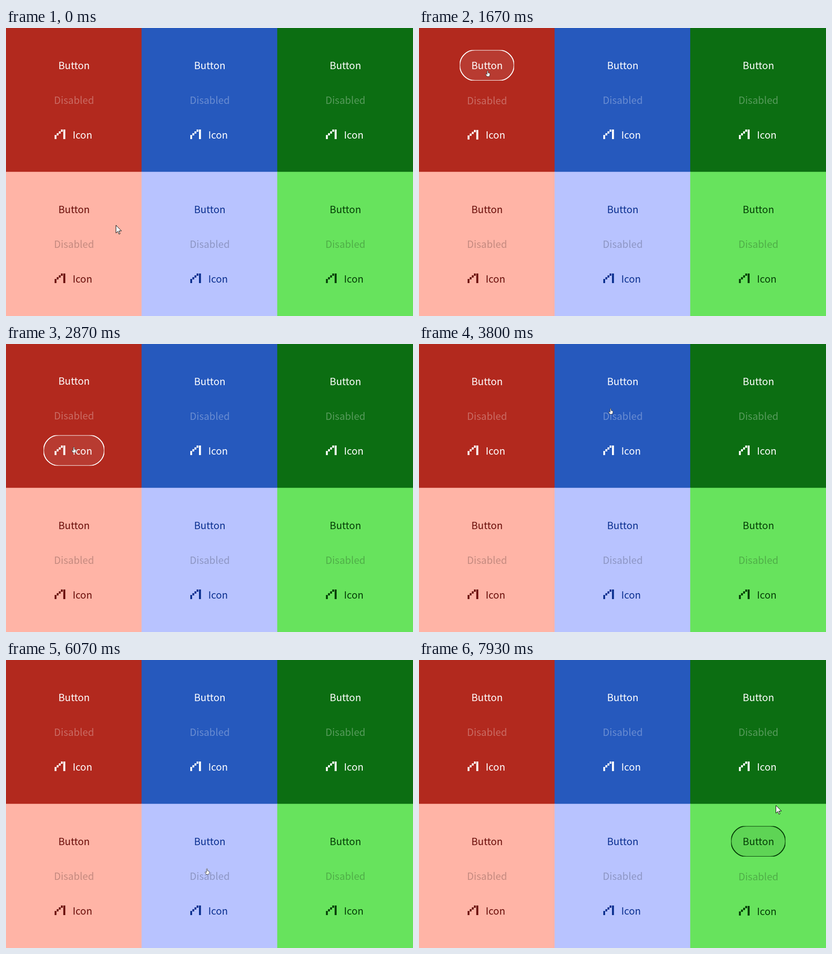
Recreate the animation shown at these times as an HTML page. Size 890 px wide and 630 px high, loop 8000 ms.

```html
<!DOCTYPE html>
<html lang="en">
<head>
<meta charset="utf-8">
<title>Button states</title>
<style>
  html, body { margin: 0; width: 100%; height: 100%; overflow: hidden; }
  svg { display: block; }
  text { font: 400 21.5px "Noto Sans CJK JP", "Noto Sans CJK SC", "Noto Sans CJK", sans-serif; }
</style>
</head>
<body>
<svg id="stage" width="890" height="630" viewBox="0 0 890 630"></svg>
<script>
const LOOP = 8000, STEP = 1000 / 15, FADE = 267;
const COLUMN = 890 / 3, ROW = 315, GAP = 75.6;
const PILL_HEIGHT = 66.8;
const NS = "http://www.w3.org/2000/svg";
const stage = document.getElementById("stage");

const themes = [
  { back: "#b2291e", ink: "#fff" },
  { back: "#2659bd", ink: "#fff" },
  { back: "#0c6e12", ink: "#fff" },
  { back: "#ffb4a6", ink: "#690d09" },
  { back: "#b8c3ff", ink: "#0a2f8f" },
  { back: "#67e35d", ink: "#043d06" }
];

// The pointer's tour: where it arrives, when, and which button it then holds.
const stop = (at, x, y, over = "", travel = FADE) => ({ at, x, y, over, depart: at - travel });
const tour = [
  stop(0, 240.5, 431.5),
  stop(330, 262, 300),
  stop(600, 174.5, 115.5),
  stop(1000, 153, 86, "0 button"),
  stop(1530, 150, 93, "0 button"),
  stop(1930, 149, 152),
  stop(2330, 147, 222, "0 icon"),
  stop(2870, 148, 225, "0 icon"),
  stop(3800, 419, 140.5, "", 730),
  stop(4270, 421, 225, "1 icon"),
  stop(5000, 429, 398, "4 button", 530),
  stop(5330, 432, 540, "4 icon"),
  stop(5730, 459, 500),
  stop(6070, 439.5, 456),
  stop(6600, 663, 460.5, "", 135),
  stop(6930, 752, 431),
  stop(7330, 741, 398, "5 button"),
  stop(7930, 780.5, 318, "5 button")
];

const ramp = (time, from, to) => Math.min(1, Math.max(0, (time - from) / (to - from)));
const ease = p => p * p * (3 - 2 * p);

function pointerAt(time) {
  let { x, y } = tour[0];
  for (const next of tour.slice(1)) {
    const p = ease(ramp(time, next.depart, next.at));
    x += (next.x - x) * p;
    y += (next.y - y) * p;
  }
  return { x, y };
}

// Fades in on arrival and out on departure; moving on within a button presses it.
function hoverAt(time, part) {
  let level = 0;
  for (let i = 1; i < tour.length; i++) {
    const was = tour[i - 1].over === part, is = tour[i].over === part;
    const { at, depart } = tour[i];
    if (is && !was) level += ramp(time, at - FADE, at);
    if (was && !is) level -= ramp(time, depart, depart + FADE);
    if (was && is) level -= .3 * Math.sin(Math.PI * ramp(time, depart, at));
  }
  return level;
}

function add(parent, tag, attrs = {}, text) {
  const node = document.createElementNS(NS, tag);
  for (const name in attrs) node.setAttribute(name, attrs[name]);
  if (text) node.textContent = text;
  return parent.appendChild(node);
}

// The clip trims the outer half of the outline on the straight edges.
function makePill(parent, cx, cy, width, ink) {
  const height = PILL_HEIGHT;
  const clip = add(parent, "svg", { x: cx - width / 2, y: cy - height / 2, width, height });
  return add(clip, "rect", { width, height, rx: height / 2, fill: ink, stroke: ink });
}

function makeIcon(parent, x, y) {
  for (let i = 0; i < 4; i++)
    add(parent, "rect", { x: x + 4.6 * i, y: y + 12 - 4 * i, width: 4, height: i ? 5 : 9 });
  add(parent, "rect", { x: x + 19, y, width: 4.3, height: 21 });
}

function makePanel({ back, ink }, i) {
  const left = (i % 3) * COLUMN, top = i < 3 ? 0 : ROW;
  const cx = left + COLUMN / 2 + .2;
  const dark = i < 3;
  add(stage, "rect", {
    x: left - .2, y: top && top - .4, width: COLUMN + 1, height: ROW + 1, fill: back
  });
  const group = add(stage, "g", { fill: ink });
  const pills = {
    button: makePill(group, cx, top + 81.6, 118.8, ink),
    icon: makePill(group, cx, top + 81.6 + 2 * GAP, 133, ink)
  };
  const label = (parent, x, row, text, attrs) =>
    add(parent, "text", { x, y: top + 90.3 + row * GAP, ...attrs }, text);
  const centred = { "text-anchor": "middle" };
  const button = label(group, cx + .3, 0, "Button", centred);
  const disabled = label(group, cx + .3, 1, "Disabled", {
    ...centred, fill: dark ? "#fff" : "#000", opacity: dark ? .31 : .23
  });
  const iconRow = add(group, "g");
  makeIcon(iconRow, cx - 42.2, top + 222);
  label(iconRow, cx - 2.9, 2, "Icon");
  return { pills, button, disabled, iconRow };
}

const panels = themes.map(makePanel);

const arrow = add(stage, "path", {
  d: "M0 0V17L4 13.3L6.6 19.5L9 18.5L6.4 12.4H12Z",
  fill: "#fff", stroke: "#000", "stroke-linejoin": "round"
});
const hand = add(stage, "path", {
  d: "M-1 1Q0-.5 1 1V5L4.5 6Q5.5 6.5 5 9L4 13H-1.5L-4 9Q-4.5 7-3 7.3L-1 9Z",
  fill: "#fff", stroke: "#222", "stroke-width": .8, "stroke-linejoin": "round"
});

const move = (node, x, y) => node.setAttribute("transform", `translate(${x} ${y})`);
const show = (node, on) => node.setAttribute("visibility", on ? "visible" : "hidden");

function setPill(pill, level) {
  pill.setAttribute("stroke-width", 2 * level);
  pill.setAttribute("fill-opacity", .085 * level);
}

function overButton({ x, y }) {
  const dx = Math.abs(x % COLUMN - COLUMN / 2);
  const row = (y % ROW - 82) / GAP;
  const nearest = Math.min(2, Math.max(0, Math.round(row)));
  return dx < 66 && Math.abs(row - nearest) * GAP < 33;
}

function draw(elapsed) {
  const time = Math.floor((elapsed % LOOP + 5) / STEP) * STEP;
  panels.forEach((panel, i) => {
    const button = hoverAt(time, `${i} button`), icon = hoverAt(time, `${i} icon`);
    setPill(panel.pills.button, button);
    setPill(panel.pills.icon, icon);
    // A hovered outline takes space and pushes its neighbours apart.
    move(panel.button, 0, -icon);
    move(panel.disabled, 0, button - icon);
    move(panel.iconRow, 0, button);
  });
  const pointer = pointerAt(time);
  const pressable = overButton(pointer);
  for (const cursor of [arrow, hand]) move(cursor, pointer.x, pointer.y);
  show(arrow, !pressable);
  show(hand, pressable);
}

const start = performance.now();
function tick() {
  draw(performance.now() - start);
  requestAnimationFrame(tick);
}
tick();
</script>
</body>
</html>
```
